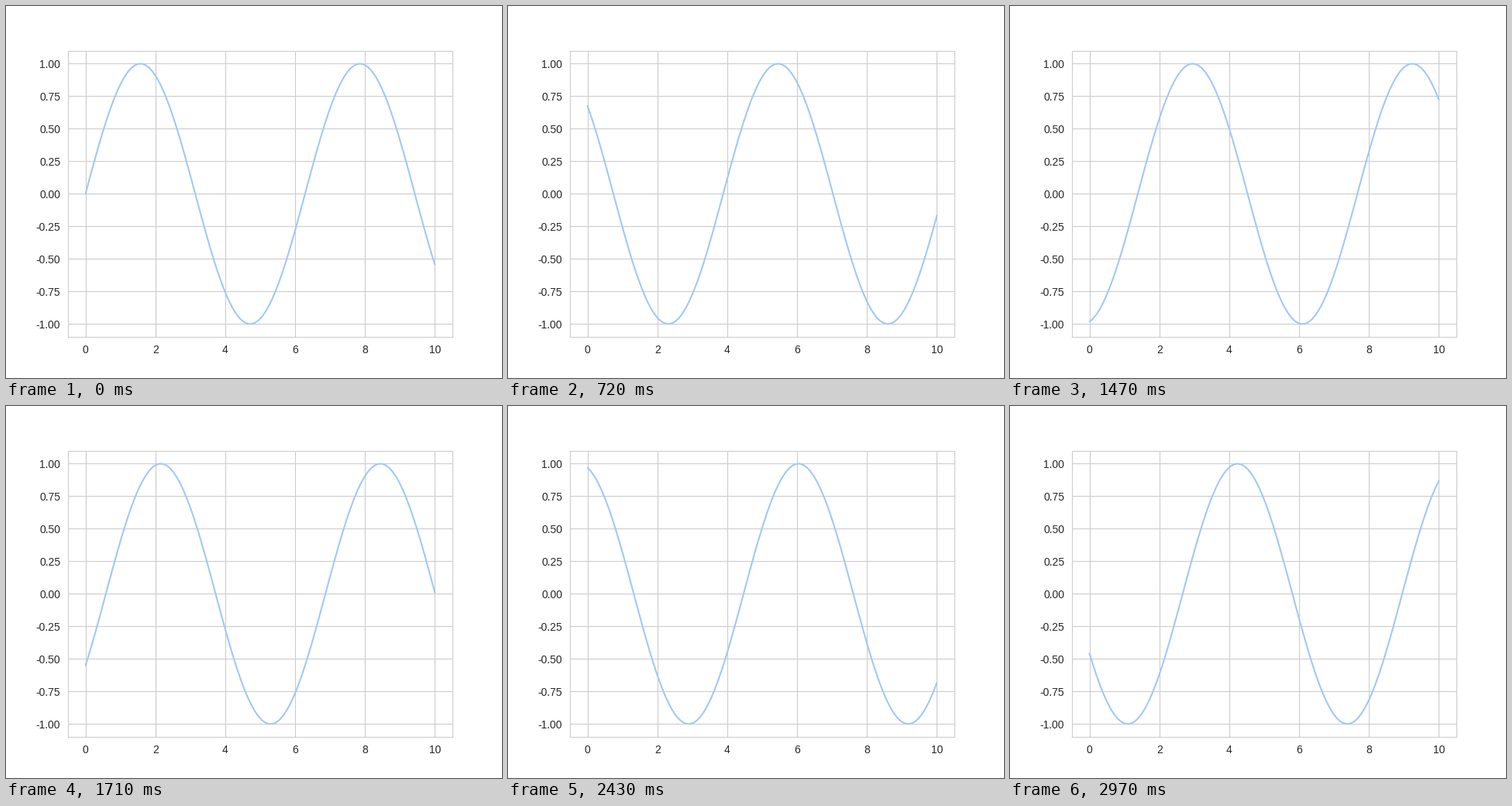
A matplotlib script that plays this animation: 640 px wide and 480 px high, repeating every 3 s.

```python
import numpy as np
import matplotlib.pyplot as plt
from matplotlib.animation import FuncAnimation

FRAMES = 100
INTERVAL = 30
INK, RULE, CURVE = "0.15", "0.8", "#a1c9f4"

plt.rcParams.update({
    "font.family": "Liberation Sans",
    "font.size": 10,
    "axes.unicode_minus": False,
    "axes.edgecolor": RULE,
    "axes.linewidth": 0.8,
    "axes.axisbelow": True,
    "axes.grid": True,
    "grid.color": RULE,
    "grid.linewidth": 0.8,
    "grid.linestyle": "-",
    "xtick.bottom": False,
    "ytick.left": False,
    "xtick.color": INK,
    "ytick.color": INK,
    "lines.solid_capstyle": "round",
})

fig, ax = plt.subplots(figsize=(6.4, 4.8), dpi=100)
x = np.linspace(0, 10, 100)
line, = ax.plot(x, np.sin(x), color=CURVE, lw=1.5)
ax.set_xlim(-0.5, 10.5)
ax.set_ylim(-1.1, 1.1)


def update(i):
    line.set_ydata(np.sin(x + i / 10))
    return line,


anim = FuncAnimation(fig, update, frames=FRAMES, interval=INTERVAL,
                     repeat=True, repeat_delay=0)
plt.show()
```
